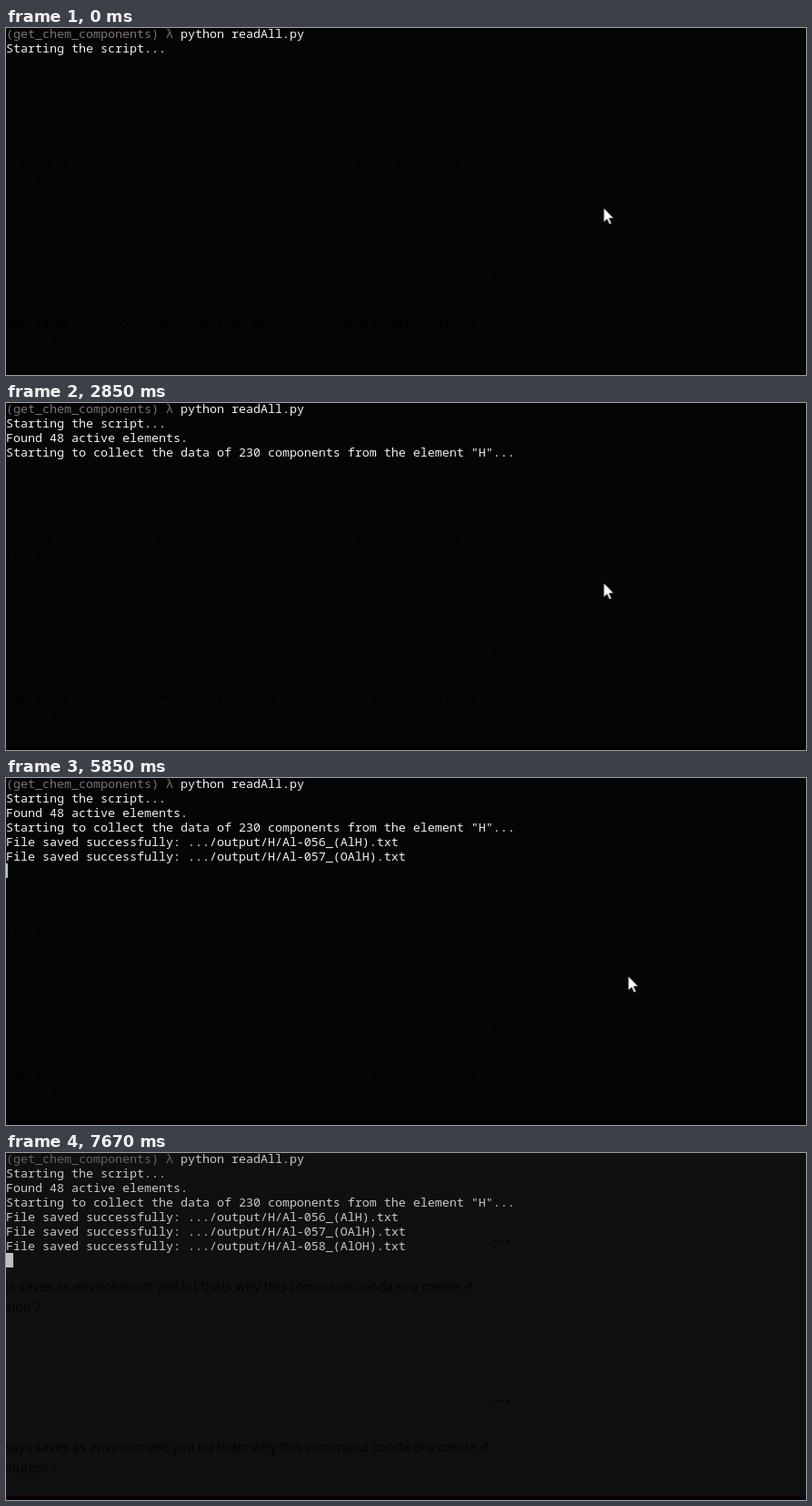
An HTML page for the animation above (7.75 s loop, 880 by 382 pixels).

```html
<!DOCTYPE html>
<html lang="en">
<head>
<meta charset="utf-8">
<title>Terminal run</title>
<style>
  html, body { margin: 0; width: 100%; height: 100%; overflow: hidden; background: #050505; }
  .stage { position: relative; width: 880px; height: 382px; overflow: hidden; background: #050505; }
  .stage, .stage * { animation: 7750ms step-end infinite; }
  .stage { animation-name: stage; }
  svg { position: absolute; left: 0; top: 0; }

  .log {
    position: absolute; left: 0; top: -2px; margin: 0; overflow: hidden;
    font: 13.3333px/16px "Noto Sans Mono", "DejaVu Sans Mono", monospace;
    font-variant-ligatures: none;
    color: #f2f2f2; white-space: pre; animation-name: reveal, dim;
  }
  .log span { color: #7b7378; }
  .caret {
    position: absolute; left: 0; top: -2px; width: 2px; height: 16px;
    background: #b4c4c4; animation-name: caret;
  }
  .behind { font: 14.5px "Open Sans", "Noto Sans", sans-serif; text-anchor: end; fill: #020202; animation-name: behind; }
  .edge { fill: #030002; animation-name: edge; }
  .mouse { fill: #fff; stroke: #000; stroke-width: .6; animation-name: mouse; }

  /* one more line of output at each step */
  @keyframes reveal {
    0%      { height: 32px }
    1.677%  { height: 48px }
    16.258% { height: 64px }
    39.354% { height: 80px }
    61.677% { height: 96px }
    83.612%, 100% { height: 112px }
  }
  @keyframes caret {
    0%      { opacity: 0; transform: translateY(32px) }
    1.677%  { opacity: 1; transform: translateY(48px) }
    8.516%  { opacity: 0; transform: translateY(48px) }
    15.354% { opacity: 1; transform: translateY(48px) }
    16.258% { opacity: 1; transform: translateY(64px) }
    23.096% { opacity: 0; transform: translateY(64px) }
    30.838% { opacity: 1; transform: translateY(64px) }
    36.774% { opacity: 0; transform: translateY(64px) }
    39.354% { opacity: 1; transform: translateY(80px) }
    46.322% { opacity: 0; transform: translateY(80px) }
    53.161% { opacity: 1; transform: translateY(80px) }
    60%     { opacity: 0; transform: translateY(80px) }
    61.677% { opacity: 1; transform: translateY(96px) }
    68.516% { opacity: 0; transform: translateY(96px) }
    75.483% { opacity: 1; transform: translateY(96px) }
    82.709% { opacity: 0; transform: translateY(96px) }
    83.612% { opacity: 1; transform: translateY(112px) }
    90.451% { opacity: 0; transform: translateY(112px) }
    97.29%  { opacity: 1; transform: translateY(112px); width: 2px; background: #b4c4c4 }
    98.967%, 100% { opacity: 1; transform: translateY(112px); width: 8px; background: #c0c0c0 }
  }
  @keyframes mouse {
    0%      { opacity: 1; transform: translate(657.5px, 198px) }
    75.483% { opacity: 1; transform: translate(684.5px, 218px); animation-timing-function: steps(4) }
    79.096% { opacity: 1; transform: translate(778.5px, 307px); animation-timing-function: steps(4) }
    82.709% { opacity: 1; transform: translate(836.5px, 365px) }
    83.612% { opacity: 0; transform: translate(836.5px, 365px) }
    94.709% { opacity: 1; transform: translate(836.5px, 367px) }
    95.612%, 100% { opacity: 0; transform: translate(836.5px, 367px) }
  }
  /* the window loses focus */
  @keyframes dim    { 0% { opacity: 1 } 98.967%, 100% { opacity: .82 } }
  @keyframes stage  { 0% { background: #050505 } 98.967%, 100% { background: #101010 } }
  @keyframes behind { 0% { fill: #020202 } 98.967%, 100% { fill: #030303 } }
  @keyframes edge   { 0% { fill: #030002 } 98.967%, 100% { fill: #0a0307 } }
</style>
</head>
<body>
<div class="stage">
  <svg width="880" height="382">
    <defs>
      <g id="post">
        <text x="531" y="329">always saves as environment.yml.txt thats why this command conda env create -f</text>
        <text x="56" y="352">solution ?</text>
      </g>
      <g id="dots">
        <circle cx="539" r="1.6"/><circle cx="545.5" r="1.6"/><circle cx="552" r="1.6"/>
      </g>
    </defs>
    <g class="behind">
      <use href="#post" x="-18" y="-177"/>
      <use href="#post"/>
      <use href="#dots" y="97"/>
      <use href="#dots" y="273"/>
    </g>
    <rect class="edge" y="378" width="880" height="4"/>
  </svg>
  <pre class="log"><span>(get_chem_components) λ</span> python readAll.py
Starting the script...
Found 48 active elements.
Starting to collect the data of 230 components from the element "H"...
File saved successfully: .../output/H/Al-056_(AlH).txt
File saved successfully: .../output/H/Al-057_(OAlH).txt
File saved successfully: .../output/H/Al-058_(AlOH).txt</pre>
  <div class="caret"></div>
  <svg width="880" height="382">
    <path class="mouse" d="M0 0V16L3.7 12.5L6.2 18.2L8.6 17.2L6.1 11.5H11Z"/>
  </svg>
</div>
</body>
</html>
```
